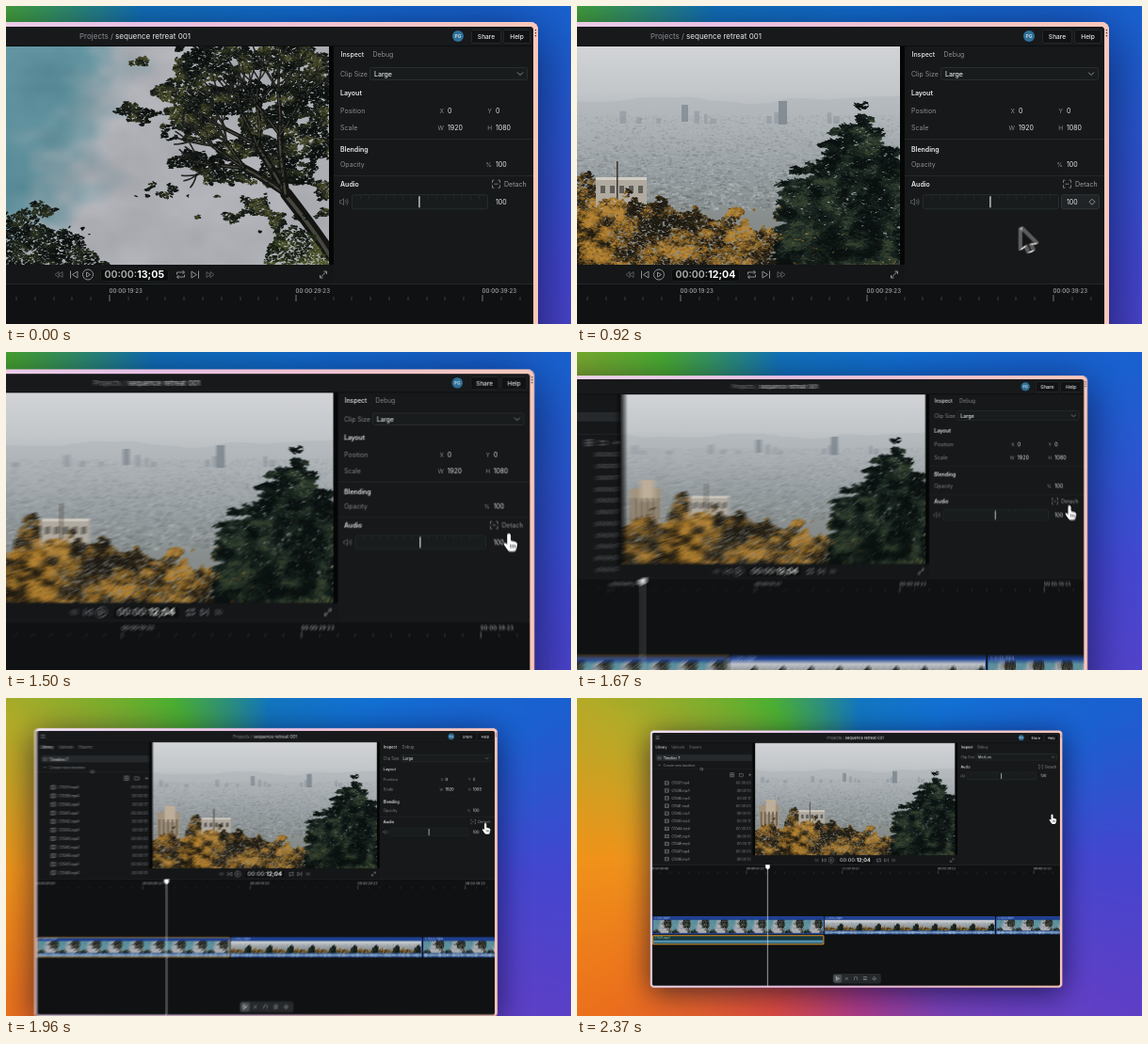
Write an HTML page with a canvas that moves like this. It is 600 px wide and 338 px high and loops after 2450 ms.

```html
<!DOCTYPE html>
<html lang="en">
<head>
<meta charset="utf-8">
<title>Editor zoom</title>
<style>
  html, body { margin: 0; width: 100%; height: 100%; overflow: hidden; background: #1670cf; }
  canvas { display: block; width: 600px; height: 338px; }
</style>
</head>
<body>
<canvas id="stage" width="600" height="338"></canvas>
<script>
const LOOP = 2450, STEP = 1000 / 24, TAU = Math.PI * 2;
const ORIGIN = { x: 450, y: 60 };          // world layer offset
const PIVOT = { x: 463, y: 53 };           // fixed point of the zoom
const TIMES = { leave: 580, hoverOn: 800, hoverOff: 1060, hand: 1240, zoom: 1430, detach: 2080 };
const WHITE = '#e8eaeb', GREY = '#8b8f92', DIM = '#55595c', LINE = '#24282a';

function layer(w, h) {
  const canvas = document.createElement('canvas');
  canvas.width = w; canvas.height = h;
  return canvas.getContext('2d');
}

const out = document.getElementById('stage').getContext('2d');
const frame = layer(600, 338);
const world = layer(1200, 690);
const backdrop = layer(1200, 690);
let g = world;

// ---- randomness ----
let seed = 7;
const rnd = () => (seed = (seed * 16807) % 2147483647) / 2147483647;
const between = (a, b) => a + (b - a) * rnd();
const clamp = v => Math.min(1, Math.max(0, v));
const mix = (a, b, k) => a + (b - a) * k;
const smooth = u => u * u * (3 - 2 * u);

function hash(x, y) {
  const s = Math.sin(x * 127.1 + y * 311.7) * 43758.5453;
  return s - Math.floor(s);
}
function noise(x, y) {
  const i = Math.floor(x), j = Math.floor(y), u = smooth(x - i), v = smooth(y - j);
  return mix(mix(hash(i, j), hash(i + 1, j), u), mix(hash(i, j + 1), hash(i + 1, j + 1), u), v);
}
const cloud = (x, y) => (noise(x, y) * 4 + noise(x * 2, y * 2) * 2 + noise(x * 4, y * 4)) / 7;

// ---- drawing helpers ----
function rect(x, y, w, h, fill, r = 0, stroke, lineWidth = 1) {
  g.beginPath();
  g.roundRect(x, y, w, h, r);
  if (fill) { g.fillStyle = fill; g.fill(); }
  if (stroke) { g.strokeStyle = stroke; g.lineWidth = lineWidth; g.stroke(); }
}
function text(str, x, y, color = WHITE, size = 7, weight = 400, align = 'left') {
  g.font = `${weight} ${size}px Inter, sans-serif`;
  g.textAlign = align;
  g.textBaseline = 'middle';
  g.fillStyle = color;
  g.fillText(str, x, y + 0.6);
  return x + g.measureText(str).width;
}
function path(d, x, y, color = GREY, fill) {
  g.save();
  g.translate(x, y);
  const p = new Path2D(d);
  if (fill) { g.fillStyle = fill; g.fill(p); }
  g.strokeStyle = color; g.lineWidth = 1; g.lineJoin = 'round';
  g.stroke(p);
  g.restore();
}
function gradient(x0, y0, x1, y1, ...colors) {
  const grad = g.createLinearGradient(x0, y0, x1, y1);
  colors.forEach((c, i) => grad.addColorStop(i / (colors.length - 1), c));
  return grad;
}

// ---- pictures shown in the viewer ----
function picture(paint) {
  g = layer(413, 232);
  g.translate(70, -43);
  paint();
  const { canvas } = g;
  g = world;
  return canvas;
}

// Leaves wherever inside(x, y) is positive; palette runs from shade to light.
function leaves(count, inside, palette, length = 1.7) {
  for (let i = 0; i < count; i++) {
    const x = between(-70, 343), y = between(43, 275);
    if (inside(x, y) <= 0) continue;
    const light = clamp(cloud(x / 15 + 40, y / 11) * 1.9 - 0.55 + between(-0.25, 0.25));
    g.fillStyle = palette[Math.floor(light * (palette.length - 0.01))];
    g.beginPath();
    g.ellipse(x, y, between(0.7, 1.3) * length, between(0.5, 1.1), between(-0.8, 0.8), 0, TAU);
    g.fill();
  }
}
const mound = (cx, top, curve, rough) => (x, y) =>
  y - top - curve * (x - cx) ** 2 + (cloud(x / 18, y / 18) - 0.5) * rough;

function branch(x, y, angle, length, width, depth) {
  const x1 = x + Math.cos(angle) * length, y1 = y + Math.sin(angle) * length;
  const bend = between(-0.12, 0.12) * length;
  for (const [color, w, dx] of [['#141412', width, 0], ['#46463f', width * 0.3, -width * 0.15]]) {
    g.strokeStyle = color;
    g.lineWidth = w;
    g.beginPath();
    g.moveTo(x + dx, y);
    g.quadraticCurveTo((x + x1) / 2 + bend, (y + y1) / 2 + bend, x1 + dx, y1);
    g.stroke();
  }
  if (!depth) return;
  for (const side of [-1, 0.15, 1])
    branch(x1, y1, angle + side * between(0.35, 0.65), length * between(0.6, 0.78), width * 0.58, depth - 1);
}

const treeShot = picture(() => {
  for (let y = 43; y < 275; y += 2) {
    for (let x = -70; x < 343; x += 2) {
      const k = smooth(clamp((x + 0.6 * (y - 43) - 130) / 130 + 0.5 + (cloud(x / 60, y / 45) - 0.5) * 1.5));
      const tone = (cloud(x / 45 + 9, y / 35) - 0.5) * 26;
      g.fillStyle = `rgb(${mix(92, 172, k) + tone},${mix(143, 174, k) + tone},${mix(155, 180, k) + tone})`;
      g.fillRect(x, y, 2, 2);
    }
  }
  const shade = ['#0c110f', '#131814', '#1b2119', '#2a2f1d', '#454727'];
  const crown = (x, y) => {
    const r = Math.hypot((x - 264) / 118, (y - 112) / 112);
    return cloud(x / 24, y / 15) - 0.37 - 0.75 * Math.max(0, r - 0.72);
  };
  leaves(42000, crown, shade);
  g.lineCap = 'round';
  branch(346, 266, -2.2, 82, 13, 4);
  leaves(9000, crown, shade);
  leaves(40000, mound(15, 212, 0.008, 60), shade.slice(0, 4));
  leaves(30000, mound(307, 240, 0.02, 40), ['#151c12', '#232c18', '#374020', '#4f5629']);
});

const cityShot = picture(() => {
  rect(-70, 43, 413, 232, gradient(0, 43, 0, 230, '#d2d4d7', '#c3c7ca', '#a9afb3', '#949b9e', '#868c8b'));
  for (let x = -70; x < 343; x += 2) {
    const ridge = 88 + 22 * cloud(x / 80, 3);
    g.fillStyle = gradient(0, ridge, 0, 135, 'rgba(150,158,164,.22)', 'rgba(150,158,164,0)');
    g.fillRect(x, ridge, 2, 135 - ridge);
  }
  for (let i = 0; i < 6500; i++) {
    const depth = rnd() ** 1.3, y = 116 + depth * 100;
    const tone = rnd() < 0.4 ? 195 : between(75, 130);
    g.fillStyle = `rgba(${tone},${tone + 7},${tone + 8},${0.1 + depth * 0.32})`;
    g.fillRect(between(-70, 343), y, between(1, 2.5 + depth * 4), between(0.7, 1.2 + depth));
  }
  for (let i = 0; i < 14; i++) {
    const h = between(4, 14);
    rect(between(-60, 280), 125 - h, between(3, 7), h, 'rgba(130,139,146,.45)');
  }
  rect(214, 101, 9, 25, 'rgba(122,132,139,.8)');
  rect(111, 105, 7, 18, 'rgba(122,132,139,.7)');

  const autumn = ['#1f1b12', '#3b2d17', '#61471f', '#876324', '#a3752b', '#b88636'];
  leaves(40000, mound(8, 173, 0.12, 26), autumn);
  rect(-62, 172, 42, 62, '#a3937c');
  rect(-48, 160, 20, 30, '#bcae99');
  rect(20, 184, 54, 32, '#b0aaa0');
  rect(20, 182, 54, 3, '#d2cdc3');
  for (let i = 0; i < 5; i++) {
    rect(25 + i * 10, 191, 5, 8, '#5e5d59');
    rect(-59 + i * 8, 185, 3, 30, '#6a6156');
  }
  rect(42, 165, 1.5, 78, '#3b3329');
  leaves(45000, mound(40, 209, 0.0006, 55), autumn);
  leaves(45000, (x, y) => Math.min(y - 113 - 1.05 * Math.abs(x - 300), (x - 214) * 1.5)
    + (cloud(x / 22, y / 7) - 0.5) * 75, ['#0b1211', '#111a17', '#18231e', '#223027', '#34412f'], 3);
});

// ---- background with the window's shadow ----
(() => {
  g = backdrop;
  const hues = ['#4446cf', '#5e3fc6', '#7840b7', '#ab3a88', '#dc4a3f', '#ec701c',
    '#f0931a', '#b3ab28', '#4db030', '#1275bf', '#1270d4', '#1a60d0'];
  const wheel = g.createConicGradient(0, ORIGIN.x + 145, ORIGIN.y + 281);
  for (let i = 0; i <= hues.length; i++) wheel.addColorStop(i / hues.length, hues[i % hues.length]);
  g.fillStyle = wheel;
  g.fillRect(0, 0, 1200, 690);
  g.translate(ORIGIN.x, ORIGIN.y);
  g.shadowColor = 'rgba(0,5,40,.68)';
  g.shadowBlur = 60;
  g.shadowOffsetY = 10;
  rect(-287, 17, 852, 532, '#f2c6d2', 8);
  g.shadowColor = 'transparent';
  rect(-287, 17, 852, 532, gradient(-287, 17, 565, 120, '#f0e0f0', '#e8c0e4', '#f9c8b9'), 8);
  for (let i = 0; i < 3; i++) rect(561.8, 25 + i * 3, 1.3, 1.3, '#3a2c33');
  g = world;
})();

// ---- interface parts ----
const ruleLine = (x, w, y) => rect(x, y, w, 1, LINE);

function button(label, x, w) {
  rect(x + 0.5, 25.5, w, 14, '#111214', 2, '#26292b');
  text(label, x + 0.5 + w / 2, 32, WHITE, 6.6, 500, 'center');
}

function header() {
  rect(-283, 22, 843, 20, '#17191b', [4, 4, 0, 0]);
  path('M-4 -3H4M-4 0H4M-4 3H4', -272, 32);
  text('sequence retreat 001', text('Projects / ', 78, 31.7, GREY, 8), 31.7, WHITE, 8);
  rect(474, 26, 12, 12, '#2f6f97', 6);
  text('PG', 480, 31.7, '#d5e6f0', 5, 600, 'center');
  button('Share', 494, 31);
  button('Help', 528, 28);
}

function library() {
  rect(-283, 43, 208, 252, '#151719');
  text('Library', -276, 51, WHITE, 7, 500);
  text('Uploads', -243, 51, GREY);
  text('Exports', -206, 51, GREY);
  rect(-276, 67, 199, 13, '#25292b', 2);
  path('M-3 -2H3V2H-3Z', -268, 74);
  text('Timeline 7', -260, 74, WHITE, 7, 500);
  path('M-3 0H3M0 -3V3', -268, 89, DIM);
  text('Create new timeline', -260, 89, GREY);
  ruleLine(-283, 208, 97);
  path('M-3 0a3 3 0 1 0 6 0a3 3 0 1 0 -6 0M-1 0H1', -181, 97, GREY, '#151719');
  path('M-4 -4H4V4H-4ZM0 -4V4M-4 0H4', -118, 109);
  path('M-4 -3H-1L0 -2H4V3H-4Z', -99, 109);
  path('M-3 0H3M0 -3V3', -81, 109);
  for (let i = 0; i < 11; i++) {
    const y = 125.7 + i * 15.75;
    path('M-4 -3.5H4V3.5H-4ZM-2 -3.5V3.5M2 -3.5V3.5', -253, y);
    text(`C10${37 + i + (i > 1)}.mp4`, -243, y, '#a6aaad');
    text(`00:00:${two(3 + (i * 7) % 21)}`, -79, y, GREY, 7, 400, 'right');
  }
}

function viewer(shot, timecode) {
  rect(-75, 43, 423, 232, '#050606');
  g.drawImage(shot, -70, 43);
  rect(-75, 275, 423, 20, '#141618');
  path('M4 -3L0 0L4 3ZM0 -3L-4 0L0 3Z', 56, 285.5, DIM);
  path('M-3.5 -4V4M4 -3.5L-1.5 0L4 3.5Z', 72, 285.5);
  path('M-5.5 0a5.5 5.5 0 1 0 11 0a5.5 5.5 0 1 0 -11 0M-1.5 -2.5L2.5 0L-1.5 2.5Z', 87, 285.5);
  rect(100.5, 279.5, 72, 13, '#0b0c0c', 3, '#1d2021');
  text(timecode, text('00:00:', 104.5, 285.3, '#b0b3b5', 10.6, 600), 285.3, '#fff', 10.6, 700);
  path('M-4 0V-2.5H4M2 -4.5L4 -2.5L2 -.5M4 0V2.5H-4M-2 .5L-4 2.5L-2 4.5', 185.5, 285.5);
  path('M3.5 -4V4M-4 -3.5L1.5 0L-4 3.5Z', 201, 285.5);
  path('M-4 -3L0 0L-4 3ZM0 -3L4 0L0 3Z', 217, 285.5, DIM);
  path('M.5 -3.5H3.5V-.5M3.5 -3.5L-3.5 3.5M-3.5 .5V3.5H-.5', 337, 285.5);
}

function audioPanel(y, hover) {
  text('Audio', 355, y, WHITE, 7, 600);
  path('M-2 -4H-4V-1M2 -4H4V-1M-4 1V4H-2M4 1V4H2M-2 0H2', 520.5, y, '#74787a');
  text('Detach', 529, y, '#9b9fa1');
  const mid = y + 19;
  path('M-4 -1.5H-2L0 -3.5V3.5L-2 1.5H-4ZM2 -2Q3.5 0 2 2M3.5 -3.5Q6 0 3.5 3.5', 358.5, mid, DIM);
  rect(367.5, mid - 7.5, 144, 15, '#181c1d', 2, '#262d2d');
  for (let x = 376; x < 510; x += 9) rect(x, mid - 7, 1, 4, '#222829');
  rect(438.3, mid - 6, 1.2, 12, '#e4e6e6');
  if (hover) {
    rect(514.5, mid - 7.5, 40, 15, '#202426', 2, '#303436');
    path('M0 -3L3 0L0 3L-3 0Z', 547, mid);
  }
  text('100', 520, mid - 0.3);
}

function property(label, y, ...cells) {
  text(label, 355, y, GREY);
  cells.forEach(([key, value], i) => {
    const x = 520 - (cells.length - 1 - i) * 51;
    text(key, x - 4, y, GREY, 6.5, 400, 'right');
    text(value, x, y);
  });
}

function inspector(detached, hover) {
  rect(348, 43, 212, 252, '#161819');
  text('Inspect', 355.5, 51.4, WHITE, 7, 500);
  text('Debug', 389.5, 51.4, GREY);
  text('Clip Size', 355, 72, GREY);
  rect(386.5, 65.5, 167, 13, '#191c1d', 2, '#2a2e30');
  text(detached ? 'Medium' : 'Large', 391, 72, WHITE, 7, 500);
  path('M-3 -1.5L0 1.5L3 -1.5', 546, 72);
  if (detached) return audioPanel(92, hover);
  text('Layout', 355, 92.4, WHITE, 7, 600);
  property('Position', 111, ['X', '0'], ['Y', '0']);
  property('Scale', 129, ['W', '1920'], ['H', '1080']);
  ruleLine(348, 212, 141);
  text('Blending', 355, 152, WHITE, 7, 600);
  property('Opacity', 168, ['%', '100']);
  ruleLine(348, 212, 180);
  audioPanel(189.2, hover);
}

function clip(x, w, shot, name, withAudio, selected) {
  g.save();
  g.beginPath(); g.roundRect(x, 402, w, 37, 2); g.clip();
  rect(x, 402, w, 37, '#1d3f8f');
  for (let i = 0; i * 39 < w; i++) g.drawImage(shot, x + i * 39, 409, 39, withAudio ? 22 : 27);
  if (withAudio) {
    rect(x, 431, w, 8, '#284f86');
    for (let i = 0; i < w; i += 2) {
      const a = 1.5 + 1.8 * Math.abs(Math.sin(i * 0.37) * Math.sin(i * 0.11 + 1));
      rect(x + i, 435 - a, 1.5, a * 2, '#9fb9d6');
    }
  }
  text(name, x + 4, 405, '#a9c0f0', 6, 500);
  g.restore();
  rect(x + 0.5, 402.5, w - 1, 36, null, 2, selected ? '#b98a35' : '#2b56b5', selected ? 1.5 : 1);
}

const two = n => String(n).padStart(2, '0');
const markX = seconds => 308 + (seconds - 29.958) * 19.8;

function timeline(detached, skimX) {
  g.save();
  g.beginPath(); g.roundRect(-283, 295, 843, 250, [0, 0, 4, 4]); g.clip();
  rect(-283, 295, 843, 250, '#0f1112');
  ruleLine(-283, 843, 295);
  for (let i = 0; i <= 43; i++) {
    const major = i % 10 === 0, x = Math.round(110 + (i - 20) * 19.8);
    rect(x - 0.5, major ? 307 : 309, 1, major ? 7 : 4, major ? '#75797b' : '#3c4042');
    if (major) text(i ? `00:00:${two(i - 1)}:23` : '00:00:00:00', x - 0.5, 302.3, '#a0a4a6', 6.1, 500);
  }
  clip(-282, 354, treeShot, 'C1041.mp4', !detached, !detached);
  clip(73, 353, cityShot, 'C1042.mp4', true);
  clip(428, 350, treeShot, 'C1038.mp4', true);
  if (detached) {
    rect(-281.5, 441.5, 353, 18, '#17383f', 2, '#d8962b', 2);
    text('C1041.mp4', -278, 446, '#8ec6a0', 6, 500);
    rect(-280, 451, 350, 6, '#3c7ea0');
    rect(-280, 453.5, 350, 1, '#9cc9da');
  }
  const head = markX(12 + 4 / 24);
  rect(head - 0.75, 300, 1.5, 245, '#c9cccd');
  path('M-4 -4.5H4V2L0 6L-4 2Z', head, 299, '#fff', '#fff');
  if (skimX !== null) rect(skimX - 0.5, 295, 1.5, 250, '#606365');
  rect(90, 520, 100, 21, '#25292c', 5);
  rect(92, 522, 17, 17, '#4a4f53', 4);
  ['M-3 -4L4 0L0 1L-1.5 4.5Z', 'M-3 -3L3 3M-3 3L3 -3', 'M-3 3V-2Q0 -6 3 -2V3',
    'M-4 -3H4M-4 0H4M-4 3H4', 'M0 -4L4 0L0 4L-4 0ZM-2 0H2']
    .forEach((icon, i) => path(icon, 100 + i * 19, 530.5, i ? '#a9adaf' : WHITE));
  g.restore();
}

function paintWorld(t) {
  const skimming = t < TIMES.leave, detached = t >= TIMES.detach;
  const skimX = skimming ? -24 + 321 * Math.pow(t / 500, 1.5) : null;
  const frames = skimming ? Math.round((29.958 + (skimX - 308) / 19.8) * 24) : 12 * 24 + 4;
  g.setTransform(1, 0, 0, 1, 0, 0);
  g.drawImage(backdrop.canvas, 0, 0);
  g.translate(ORIGIN.x, ORIGIN.y);
  rect(-283, 22, 843, 523, '#0c0e0f', 4);
  header();
  library();
  viewer(skimming ? treeShot : cityShot, `${two(Math.floor(frames / 24))};${two(frames % 24)}`);
  inspector(detached, t >= TIMES.hoverOn && t < TIMES.hoverOff);
  timeline(detached, skimX);
}

// ---- motion: critically damped springs ----
function settle(elapsed, rate) {
  const w = Math.max(0, elapsed) * rate;
  return 1 - (1 + w) * Math.exp(-w);
}
const zoomAt = t => 1 - 0.494 * settle(t - TIMES.zoom, 0.0065);
const cursorAt = t => [mix(-470, 544, settle(t, 0.0047)), mix(481, 190, settle(t, 0.0036))];

const ARROW = new Path2D('M0 0V22L5 17.5L8.5 25L12.5 23.5L9 16H16Z');
const HAND = new Path2D('M6 0c1.2 0 2 .8 2 2v6l5 1.2c1.6.4 2.4 1.6 2.2 3.2l-.8 4c-.4 2-1.4 3.6-3.4 3.6H7.5c-1.4 0-2.2-.6-3-1.8L.6 12.6c-.8-1.4.6-2.6 2-1.8L4 12V2c0-1.2.8-2 2-2z');
const FINGERS = new Path2D('M8 12v4M10.4 12.3v3.7M12.6 12.6v3.2');

function drawCursor(t) {
  const [x, y] = cursorAt(t), hand = t >= TIMES.hand, shape = hand ? HAND : ARROW;
  frame.save();
  frame.translate(hand ? x - 6 : x, y);
  frame.lineJoin = 'round';
  frame.lineWidth = hand ? 1.4 : 3;
  frame.strokeStyle = hand ? '#111' : '#e6e6e6';
  frame.fillStyle = hand ? '#fff' : '#151515';
  frame.stroke(shape);
  frame.fill(shape);
  if (hand) {
    frame.lineWidth = 0.8;
    frame.stroke(FINGERS);
  }
  frame.restore();
}

const SAMPLES = 8, SHUTTER = 13;
frame.imageSmoothingQuality = 'high';

// Averages several moments of the shutter into one blurred frame.
function render(t) {
  paintWorld(t);
  for (let k = 0; k < SAMPLES; k++) {
    const at = t + SHUTTER * (k / (SAMPLES - 1) - 0.5);
    const s = zoomAt(at);
    frame.setTransform(s, 0, 0, s, PIVOT.x * (1 - s), PIVOT.y * (1 - s));
    frame.drawImage(world.canvas, -ORIGIN.x, -ORIGIN.y);
    drawCursor(at);
    out.globalAlpha = 1 / (k + 1);
    out.drawImage(frame.canvas, 0, 0);
  }
}

const start = performance.now();
let shown = -1;
function tick() {
  const t = (performance.now() - start) % LOOP;
  const step = Math.min(57, Math.floor(t / STEP + 0.15));
  if (step !== shown) render((shown = step) * STEP);
  requestAnimationFrame(tick);
}
tick();
</script>
</body>
</html>
```
